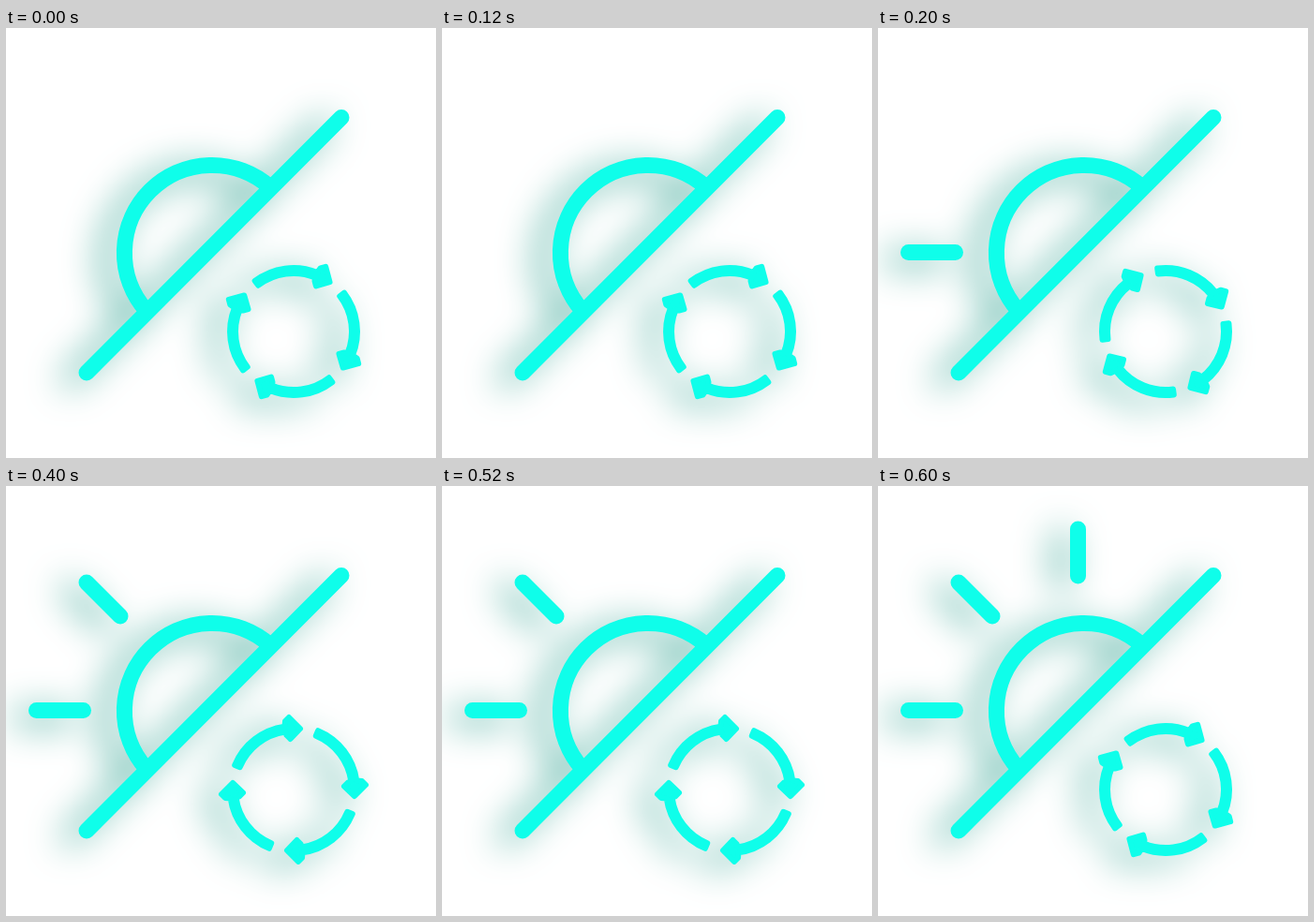
Write an HTML page that moves like this. It is 459 by 459 pixels and loops after 0.8 s.

```html
<!DOCTYPE html>
<html lang="en">
<head>
<meta charset="utf-8">
<title>Sunset cycle</title>
<style>
html, body { margin: 0; width: 100%; height: 100%; overflow: hidden; background: #fff; }
svg { display: block; width: 459px; height: 459px; }
.icon { filter: drop-shadow(-18px 8px 19px rgb(98, 184, 171)); }
.sun { fill: none; stroke: #0ffeea; stroke-width: 17; stroke-linecap: round; }
.cycle { fill: #0ffeea; stroke: #0ffeea; stroke-width: 6; stroke-linejoin: round; }
</style>
</head>
<body>
<svg viewBox="0 0 459 459">
  <g class="icon">
    <g class="sun">
      <path d="M150 302A93.5 93.5 0 0 1 282 170M86 368L358 95.5"/>
      <path class="ray" d="M32.5 239.5H82.5"/>
      <path class="ray" d="M86 103L122 139"/>
      <path class="ray" d="M213.5 46V96"/>
    </g>
    <g class="cycle" id="cycle">
      <path id="arrow" d="M23.8-57.3L26.1-62.8A68 68 0 0 1 67.3-9.5L73-9 77-5 65 7 54-3.5 58-7.5 61.4-8.6A62 62 0 0 0 23.8-57.3Z"/>
      <use href="#arrow" transform="rotate(90)"/>
      <use href="#arrow" transform="rotate(180)"/>
      <use href="#arrow" transform="rotate(270)"/>
    </g>
  </g>
</svg>
<script>
const STEP = 200, STEPS = 4;
const rays = document.querySelectorAll('.ray');
const cycle = document.getElementById('cycle');
const start = performance.now();

// Each step lights one more ray and turns the arrows by 30 degrees.
function draw() {
  const step = Math.floor((performance.now() - start) / STEP) % STEPS;
  rays.forEach((ray, i) => ray.setAttribute('visibility', i < step ? 'visible' : 'hidden'));
  cycle.setAttribute('transform', `translate(307 324) rotate(${step * 30 - 60})`);
  requestAnimationFrame(draw);
}
draw();
</script>
</body>
</html>
```
